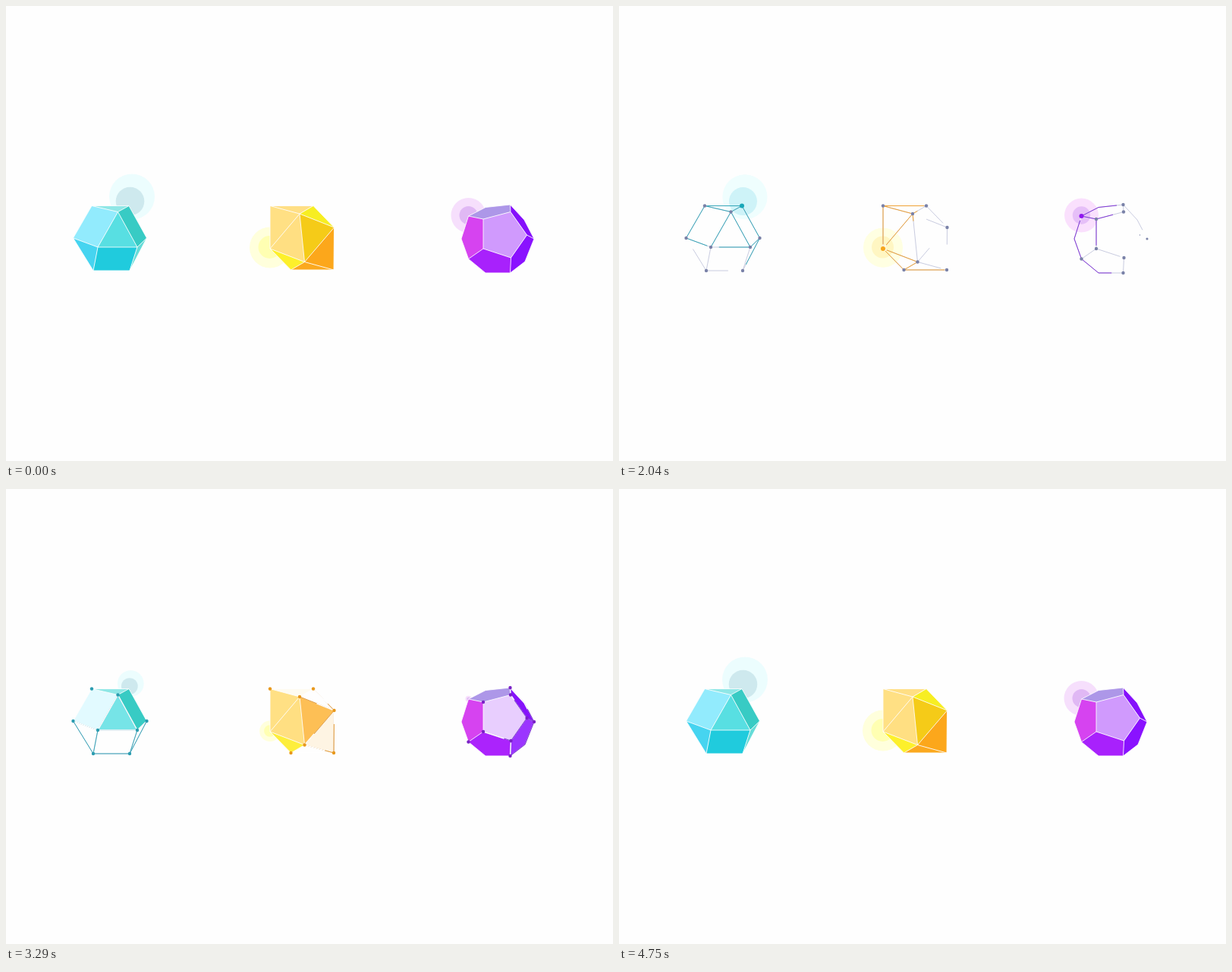
Write an HTML page with a canvas that moves like this. It is 800 by 600 pixels and loops after 4.79 s.

```html
<!DOCTYPE html>
<html lang="en">
<head>
<meta charset="utf-8">
<title>Crystals</title>
<style>
  html, body { margin: 0; width: 100%; height: 100%; overflow: hidden; background: #fefefe; }
  canvas { display: block; width: 800px; height: 600px; }
</style>
</head>
<body>
<canvas id="stage" width="800" height="600"></canvas>
<script>
const LOOP = 4790, HOLD = 500, DRAW = 400;
const ctx = document.getElementById('stage').getContext('2d');

// edges: 'path grey colour white', each a delay in steps; a missing delay repeats the one before.
// faces: 'corners colour start'. Lowercase corners in "bends" carry no dot.
const gems = [
  {
    points: { A: [113, 263.5], R: [162, 263.5], C: [147.5, 271.5], D: [88.5, 306], E: [185.5, 306],
              F: [121, 318], G: [173, 318], H: [115, 349], I: [163, 349] },
    edges: ['RA 0', 'RC 4', 'RE 4', 'AC 6', 'AD 6 5.5', 'CF 6 6 9', 'CG 6 6 9', 'DF 7 7 9', 'EG 6.5 6.5 9',
            'GF 7.3 7.3 9', 'EI 7.2 7.2 14', 'GI 11 11 14', 'FH 11 11 14', 'HD 14.2', 'HI 14.5'],
    faces: ['ARC #8fe7e6 2550', 'RCGE #38cbc4 2690', 'CFG #58dfe2 2800', 'ACFD #92ebfd 3130',
            'DFH #46d4f0 3350', 'FGIH #20cbdd 3350', 'GEI #66dcd8 3500'],
    bends: '', late: 'FHI', line: '#36a6b8', dot: '#2b9cb0', root: '#17a6b8', whiteStep: 95, whiteStart: 2040,
    halo: { outer: [4, -12, 30], inner: [1.5, -6, 18.8] },
    pulses: [{ start: 540, span: 2000, outer: '#effefe', inner: '#cef3f8' },
             { start: 2705, span: 2340, outer: '#ecfdfe', inner: '#cee9ee' }]
  },
  {
    points: { A: [348, 263.5], B: [405, 263.5], C: [387, 274], D: [432.5, 292], R: [348, 320],
              F: [393.5, 337.5], G: [375.5, 348], H: [432, 348] },
    edges: ['RA 0', 'RC 0', 'RG 0', 'RF 0', 'AC 4.5', 'GF 5', 'AB 6.5', 'GH 6.5', 'CB 9.5', 'CF 10.5',
            'BD 13.5', 'FH 13.5', 'DC 14.5', 'DH 15.5', 'FD 15.5'],
    faces: ['ACR #ffe084 2150', 'RCF #ffdf82 2150', 'RFG #ffe98c 2200', 'RFG #fdf02b 2800',
            'CDF #fdb740 2760', 'CDF #f5cb18 3330', 'ABC #ffdf85 3220', 'DFH #fca71b 3220',
            'BCD #f7ee22 3310', 'FGH #fba91f 3650'],
    bends: '', late: 'BDFH', line: '#efa235', dot: '#e8981c', root: '#f6a51c', whiteStep: 75, whiteStart: 2000,
    halo: { outer: [0, -1.5, 27], inner: [-.5, -2, 15] },
    pulses: [{ start: 690, span: 2000, outer: '#ffffe2', inner: '#fff6c2' },
             { start: 2894, span: 1870, outer: '#ffffdc', inner: '#ffffb2' }]
  },
  {
    points: { R: [609.5, 277], j: [632, 265.5], A: [664.5, 262], B: [665, 271.5], C: [629, 281],
              k: [600, 307], D: [609.5, 333.5], E: [629, 320], l: [632, 352], F: [664.5, 352],
              G: [665.5, 332], H: [686.5, 302], I: [696, 307], m: [683, 282], n: [684, 337] },
    edges: ['RkD 0', 'RC 0', 'RjA 1.6 7', 'CE 6.8', 'DlF 7.5', 'CB 8.2', 'DE 11', 'FG 12.5', 'AB 13',
            'EG 13.2', 'AmI 13.7', 'HG 17.6', 'IH 19', 'BH 20 20 16', 'InF 22'],
    faces: ['RCEDk #d643f0 2150', 'DEGFl #c83dfb 2250', 'DEGFl #a821fc 2750', 'RjABC #ad97e8 2560',
            'AmIHB #8510fb 2700', 'FGHIn #8a12ff 2780', 'CBHGE #d09afd 3000'],
    bends: 'jklmn', late: 'ABEFGHI', line: '#8136d6', dot: '#7a22c6', root: '#9015f0', whiteStep: 75, whiteStart: 2000,
    halo: { outer: [0, -1, 23], inner: [0, -1, 12] },
    pulses: [{ start: 612, span: 2000, outer: '#fae0fd', inner: '#e6bff8' },
             { start: 3200, span: 1457, outer: '#f6dffc', inner: '#e0b8f4' }]
  }
];

const progress = (t, start, span) => Math.min(1, Math.max(0, (t - start) / span));
const easeOut = p => 1 - (1 - p) ** 3;

function disc(x, y, r, color) {
  if (r <= 0) return;
  ctx.fillStyle = color;
  ctx.beginPath();
  ctx.arc(x, y, r, 0, 2 * Math.PI);
  ctx.fill();
}

function partialPath(points, amount, color, width) {
  if (amount <= 0) return;
  const lengths = points.slice(1).map((p, i) => Math.hypot(p[0] - points[i][0], p[1] - points[i][1]));
  let left = amount * lengths.reduce((a, b) => a + b);
  ctx.strokeStyle = color;
  ctx.lineWidth = width;
  ctx.beginPath();
  ctx.moveTo(...points[0]);
  for (let i = 0; i < lengths.length && left > 0; i++) {
    const [x, y] = points[i], [nx, ny] = points[i + 1];
    const part = Math.min(1, left / lengths[i]);
    ctx.lineTo(x + (nx - x) * part, y + (ny - y) * part);
    left -= lengths[i];
  }
  ctx.stroke();
}

function prepare(gem) {
  const corners = names => [...names].map(n => gem.points[n]);
  const appear = {};
  gem.strokes = gem.edges.map(text => {
    const [names, ...delays] = text.split(' ');
    const [g, c = g, w = c] = delays.map(Number);
    const grey = 640 + 80 * g;
    const first = names[0], last = names[names.length - 1];
    appear[first] = Math.min(appear[first] ?? Infinity, grey - 50);
    appear[last] = Math.min(appear[last] ?? Infinity, grey + DRAW - 200);
    return { path: corners(names), grey, color: 1140 + 80 * c, white: gem.whiteStart + gem.whiteStep * w };
  });
  gem.sides = gem.faces.map(text => {
    const [names, color, start] = text.split(' ');
    return { path: corners(names), color, start: +start };
  });
  gem.dots = Object.keys(gem.points).filter(n => n !== 'R' && !gem.bends.includes(n)).map(n => {
    const late = gem.late.includes(n);
    return { at: gem.points[n], appear: appear[n], tint: late ? 2900 : 2500, vanish: late ? 4150 : 3480 };
  });
}

function drawHalos(gem, t) {
  const [x, y] = gem.points.R;
  gem.pulses.forEach((pulse, i) => {
    const scale = easeOut(progress(t, pulse.start, pulse.span));
    for (const ring of ['outer', 'inner']) {
      const [dx, dy, r] = gem.halo[ring];
      const fade = ring === 'outer' ? progress(t, 2500, 500) : progress(t, 2250, 450);
      ctx.globalAlpha = i === 0 ? 1 - fade : 1;
      disc(x + dx * scale, y + dy * scale, r * scale, pulse[ring]);
    }
  });
  ctx.globalAlpha = 1;
}

function drawSides(gem, t) {
  for (const side of gem.sides) {
    ctx.globalAlpha = progress(t, side.start, 600);
    ctx.fillStyle = side.color;
    ctx.beginPath();
    side.path.forEach(p => ctx.lineTo(...p));
    ctx.fill();
  }
  ctx.globalAlpha = 1;
}

function drawStrokes(gem, t) {
  for (const s of gem.strokes) {
    const white = progress(t, s.white, DRAW);
    if (white < 1) {
      partialPath(s.path, progress(t, s.grey, DRAW), '#c9cce0', 1);
      partialPath(s.path, progress(t, s.color, DRAW), gem.line, 1);
    }
    partialPath(s.path, white, white < 1 ? '#fefefe' : 'rgba(254,254,254,.85)', white < 1 ? 1.4 : 1);
  }
}

function drawDots(gem, t) {
  for (const d of gem.dots) {
    const size = progress(t, d.appear, 150) * Math.min(1, Math.abs(t - d.tint) / 80) * (1 - progress(t, d.vanish, 350));
    disc(...d.at, 2.2 * size, t < d.tint ? '#7a82a8' : gem.dot);
  }
  const rootSize = easeOut(progress(t, HOLD, 200)) * (1 - progress(t, 2850, 350));
  disc(...gem.points.R, 3 * rootSize, gem.root);
}

function render() {
  const now = performance.now() % LOOP;
  const t = now < HOLD ? LOOP : now;
  ctx.fillStyle = '#fefefe';
  ctx.fillRect(0, 0, 800, 600);
  ctx.save();
  ctx.translate(0, 20 * (1 - easeOut(progress(t, HOLD, 1400))));
  for (const gem of gems) {
    drawHalos(gem, t);
    drawSides(gem, t);
    drawStrokes(gem, t);
    drawDots(gem, t);
  }
  ctx.restore();
  requestAnimationFrame(render);
}

ctx.lineJoin = 'round';
gems.forEach(prepare);
render();
</script>
</body>
</html>
```
